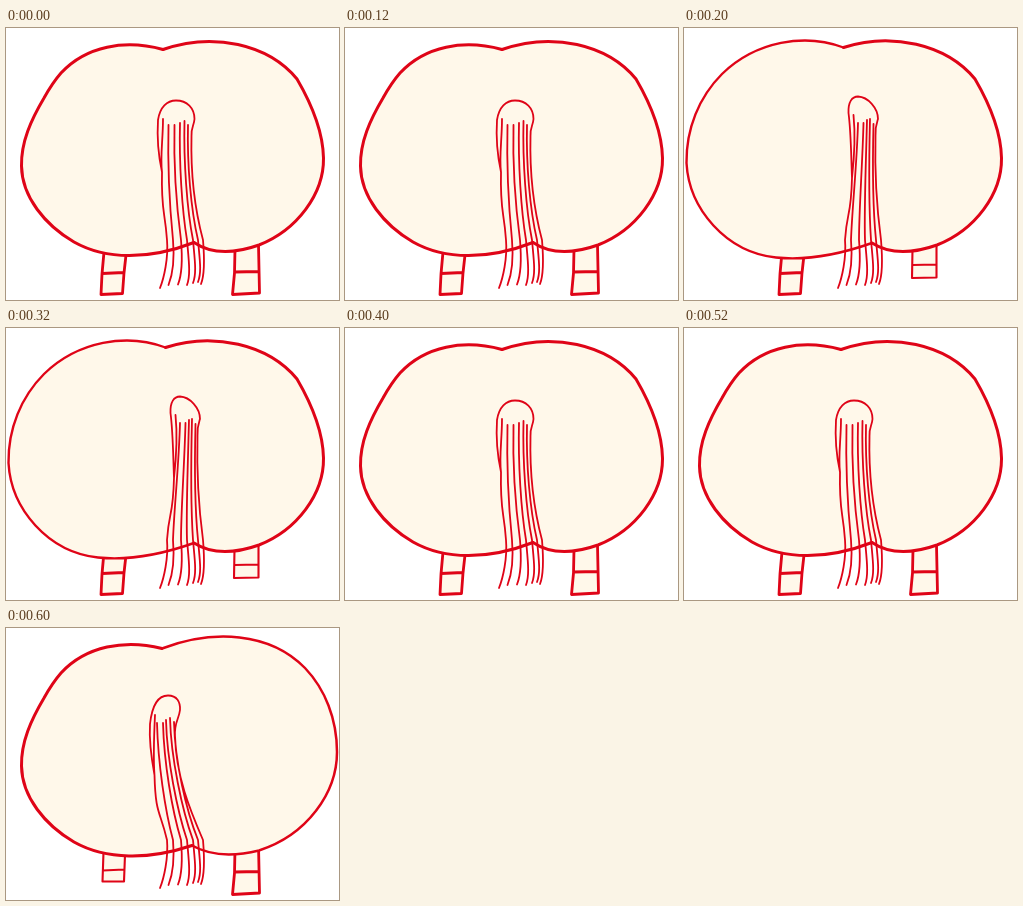
Animation of 333x272 px, one loop 0.8 s. Source, as an HTML page:

```html
<!DOCTYPE html>
<html lang="en">
<head>
<meta charset="utf-8">
<title>Swaying rump</title>
<style>
html, body { margin: 0; width: 100%; height: 100%; overflow: hidden; background: #fff; }
svg { display: block; width: 100vw; height: 100vh; }
path { stroke: #df0417; stroke-linecap: round; stroke-linejoin: round; fill: none; }
.skin { fill: #fff8ea; }
.fill { stroke: none; }
</style>
</head>
<body>
<svg viewBox="0 0 333 272">
  <path id="legL" class="skin"/>
  <path id="legR" class="skin"/>
  <path id="body" class="skin fill"/>
  <path id="sideL"/>
  <path id="sideR"/>
  <path id="tail" stroke-width="1.8"/>
</svg>
<script>
const STEP = 200;

// Each half runs between the top notch and the bottom notch.
const leftHalf = {
  rest: '119 11 80 18 55 45 C48 53 43 61 38 70 C25 92 15 114 15.500 138 C16 169 39 197 68 214 C100 232 143 232 ',
  out: '121 5 72 13 38 46 C15 69 2 101 2.500 135 C5 181 42 224 92 229.500 C126 233 157 226 '
};
const rightHalf = {
  rest: 'C202 224 222 228 253 217 C291 202 318 166 317.500 130 C317 104 305 75 291 51 C262 16 207 4 ',
  out: 'C201 226 222 230 253 222.500 C301 207 331 165 331 124 C331 91 319 61 299 40 C264 4 207 1 '
};
const leg = {
  L: {
    rest: 'M98 224L96 246L95 266.500L116.500 265.500L118 245L120 227M96 245.500L118 244.500',
    up: 'M97.500 224L96.500 253.500L118 253.500L119 227M97 242.500L118 241.500'
  },
  R: {
    rest: 'M229 221L228.500 245L226.500 266.500L253.500 265L252.500 217M228.500 244L253 243.500',
    up: 'M228.500 221L228 250L252.500 249.500L252.500 217M228.500 237L252 236.500'
  }
};

const poses = {
  mid: {
    top: [157, 21.5], low: [188, 214.5], bend: -2, join: [156, 144],
    loop: 'M156 144C152 126 151 108 152 92C154 79 161 72.500 170 72.500C181 72.500 188.500 80 188.500 91C188 98 185 99 185.500 108',
    inner: 'M157 91C157 112 154 129 156 144',
    roots: [[162.5, 97], [168.5, 97], [174, 95], [178.5, 93], [182, 97], [185.5, 108]]
  },
  left: {
    top: [159.5, 19.5], low: [188, 215], bend: 2, join: [168, 150],
    loop: 'M168 150C167 124 167 104 164.500 85C164 74 168 68.500 174 68.500C184 69 194 80 194 91C192 97 191 99 191.500 108',
    inner: 'M169.500 87C172 112 170 132 168 150',
    roots: [[174, 95], [179.5, 95], [183, 92], [186, 91], [189.5, 96], [191.5, 108]]
  },
  right: {
    top: [156, 20.5], low: [186, 217.5], bend: -7, join: [148.5, 147],
    loop: 'M148.500 147C145 128 143 112 144 96C146 78 152 67.500 162 67.500C171 67.500 174.500 74 174 82C173 91 168 95 169 108',
    inner: 'M149 87C148 108 147 128 148.500 147',
    roots: [[151, 95], [157, 95], [160, 92], [164, 90], [168, 94], [169, 108]]
  }
};
const cycle = ['mid', 'left', 'mid', 'right'];

// The lower tail stays put: crossing x at y 212, then the tip.
const waist = [161, 167, 175, 181, 187, 192, 197];
const tips = [[154, 260], [162.5, 257], [172, 256.5], [181, 257], [187, 255], [192, 254], [195, 256]];

function strand([x, y], i, bend) {
  const w = waist[i], [tx, ty] = tips[i];
  const pull = bend - i;
  return `M${x} ${y}C${x - 1 + (bend < -5 ? 2 : 0)} ${y + 40} ${w + pull} 182 ${w} 212` +
    `C${w + 1.5} 230 ${tx + 4} ${ty - 10} ${tx} ${ty}`;
}

function set(id, d, width) {
  const el = document.getElementById(id);
  el.setAttribute('d', d);
  if (width) el.setAttribute('stroke-width', width);
}

function draw(name) {
  const p = poses[name];
  const l = name === 'left', r = name === 'right';
  const left = `M${p.top}C${leftHalf[l ? 'out' : 'rest']}${p.low}`;
  const right = `${rightHalf[r ? 'out' : 'rest']}${p.top}`;
  set('body', left + right + 'Z');
  set('sideL', left, l ? 2.4 : 3);
  set('sideR', `M${p.low}${right}`, r ? 2.5 : 3);
  set('legL', leg.L[r ? 'up' : 'rest'], r ? 2.1 : 2.8);
  set('legR', leg.R[l ? 'up' : 'rest'], l ? 2.1 : 2.8);
  const hairs = [p.join, ...p.roots].map((root, i) => strand(root, i, p.bend));
  set('tail', p.loop + p.inner + hairs.join(''));
}

let shown;
function tick(now) {
  const name = cycle[Math.floor(now / STEP) % cycle.length];
  if (name !== shown) draw(shown = name);
  requestAnimationFrame(tick);
}
const start = performance.now();
const loop = () => {
  const name = cycle[Math.floor((performance.now() - start) / STEP) % cycle.length];
  if (name !== shown) draw(shown = name);
  requestAnimationFrame(loop);
};
loop();
</script>
</body>
</html>
```
